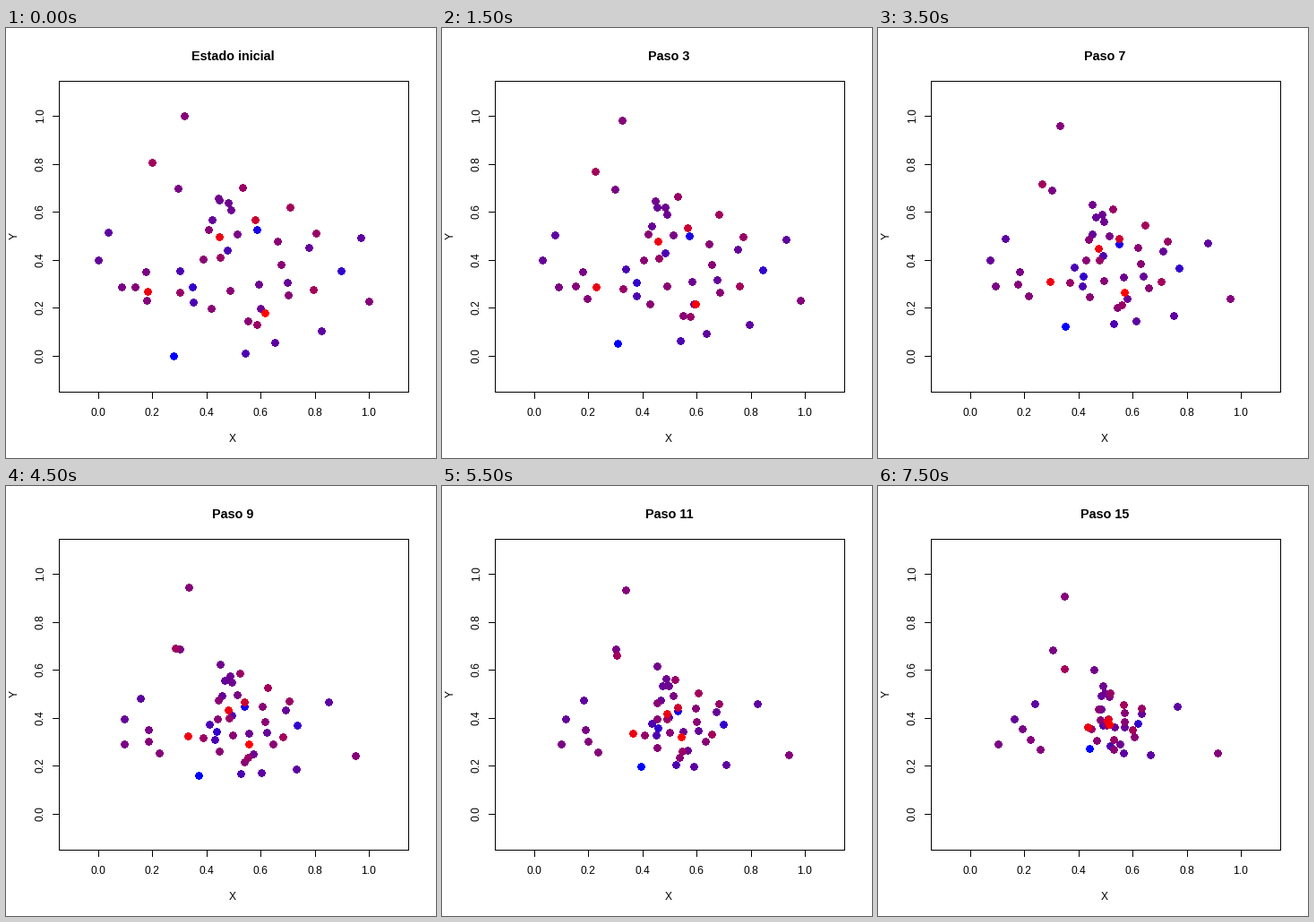
Write a matplotlib script that moves like this. It is 480x480 px and loops after 8 s.

```python
import numpy as np
import matplotlib.pyplot as plt
from matplotlib.animation import FuncAnimation

SIZE, DPI = 480, 100
PT = 72 / DPI  # points per pixel
STEPS, STEP_MS = 16, 500
LEFT, RIGHT, TOP, BOTTOM = 59, 449, 59, 406
CENTER = np.array([256, 262])
NEUTRAL = 0.47  # redness of a particle that stays put
REACH = 110     # longest pull over one loop, in pixels

plt.rcParams["font.family"] = "Liberation Sans"

# Starting places in pixels, grouped by redness (0 blue, 1 red).
SWARM = {
    0.00: [(187, 366)],
    0.10: [(280, 225)],
    0.20: [(374, 271), (208, 289)],
    0.30: [(267, 363), (194, 271), (209, 306), (247, 248)],
    0.37: [(396, 234), (300, 351), (352, 338), (114, 228)],
    0.40: [(338, 245), (103, 259), (230, 214), (238, 192), (314, 284)],
    0.43: [(248, 195), (251, 203), (282, 286), (284, 313)],
    0.45: [(237, 190)],
    0.48: [(258, 230), (156, 272), (192, 179), (129, 289)],
    0.52: [(199, 98), (144, 289), (157, 304), (405, 305)],
    0.54: [(303, 238), (307, 264), (315, 298), (270, 327), (250, 293),
           (226, 225), (220, 258), (229, 313)],
    0.60: [(264, 178), (346, 229), (194, 295), (239, 256), (280, 331)],
    0.64: [(163, 150), (317, 200), (343, 292)],
    0.80: [(278, 214)],
    0.93: [(238, 233), (158, 294)],
    1.00: [(289, 318)],
}
start = np.array([p for group in SWARM.values() for p in group], float)
redness = np.repeat(list(SWARM), [len(group) for group in SWARM.values()])

# Purer colours are pulled harder; nobody overshoots the centre.
spread = np.where(redness < NEUTRAL, 0.14, 0.20)
pull = REACH * np.tanh(np.abs(redness - NEUTRAL) / spread)
to_center = CENTER - start
distance = np.hypot(*to_center.T)
travel = to_center * np.tanh(pull / distance)[:, None]


def positions(step):
    s = step / (STEPS - 1)
    return np.round(start + travel * s * (0.93 + 0.07 * s)) + 0.5


fig = plt.figure(figsize=(SIZE / DPI, SIZE / DPI), dpi=DPI, facecolor="white")
ax = fig.add_axes([0, 0, 1, 1])
ax.set_xlim(0, SIZE)
ax.set_ylim(SIZE, 0)
ax.axis("off")


def line(xs, ys):
    ax.plot(xs, ys, color="black", lw=PT, antialiased=False,
            solid_capstyle="projecting", solid_joinstyle="miter")


def label(x, y, text, px=12, **kw):
    return ax.text(x, y, text, fontsize=px * PT, color="black", ha="center",
                   va="baseline", rotation_mode="anchor", **kw)


line([LEFT, RIGHT, RIGHT, LEFT, LEFT], [TOP, TOP, BOTTOM, BOTTOM, TOP])

for v in np.linspace(0, 1, 6):
    x, y = round(102.9 + 302.2 * v), round(366 - 268 * v)
    line([x, x], [BOTTOM, BOTTOM + 7])
    line([LEFT - 7, LEFT], [y, y])
    label(x - 0.5, 433, f"{v:.1f}")
    label(42, y, f"{v:.1f}", rotation=90)

label(253, 462, "X")
label(13, 232.5, "Y", rotation=90)
title = label(253.5, 36, "", px=14.4, fontweight="bold")

colors = np.column_stack([redness, np.zeros_like(redness), 1 - redness])
dots = ax.scatter(*positions(0).T, s=(7.2 * PT) ** 2, c=colors, linewidths=0,
                  antialiased=False, zorder=3)


def draw(step):
    title.set_text(f"Paso {step}" if step else "Estado inicial")
    dots.set_offsets(positions(step))
    return title, dots


anim = FuncAnimation(fig, draw, frames=STEPS, interval=STEP_MS,
                     repeat=True, repeat_delay=0)
plt.show()
```
